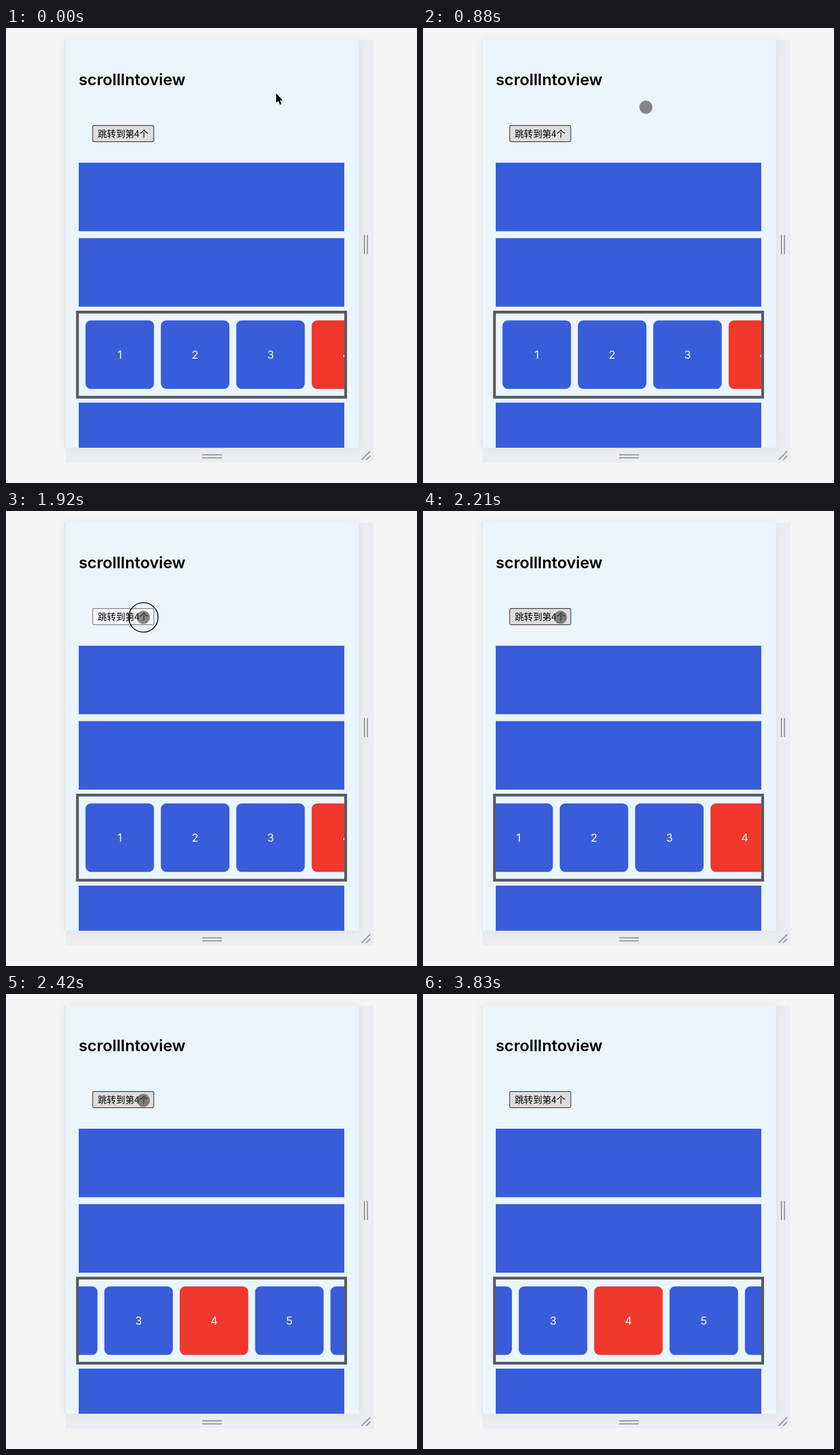
Animation, 712 px wide and 787 px high, one loop 3930 ms. Source, as an HTML page:

```html
<!DOCTYPE html>
<html lang="zh">
<head>
<meta charset="utf-8">
<title>scrollIntoview</title>
<style>
  html, body { margin: 0; width: 100%; height: 100%; overflow: hidden; background: #f5f5f5; }
  svg { display: block; width: 712px; height: 787px; }
  .page { fill: #eaf5fc; filter: drop-shadow(0 0 8px rgba(0, 0, 0, .06)); }
  .strip { fill: #ecedf1; }
  .grip { stroke: #929497; stroke-width: 2; fill: none; }
  .bar, .tile { fill: #395cdb; }
  .tile.goal { fill: #f0382d; }
  .num { font: 400 19px Inter, sans-serif; fill: #fff; text-anchor: middle; }
  h1, .title { font: 600 27.5px Inter, sans-serif; }
  .label { font: 400 15.83px "Noto Sans CJK SC", "Noto Sans CJK", sans-serif; }
</style>
</head>
<body>
<svg viewBox="0 0 712 787">
  <defs>
    <clipPath id="view"><rect x="126" y="494" width="460" height="142"/></clipPath>
  </defs>
  <rect class="strip" x="103" y="20" width="534" height="731.5"/>
  <rect class="page" x="102" y="20" width="509.5" height="706"/>
  <path d="M102.3 20V726" stroke="#cdd5da" stroke-width=".8"/>
  <path class="grip" d="M621 358V391M626.2 358V391M340 738.3H374M340 743.4H374M616 747L631 732M624 747L631 740"/>

  <text class="title" x="126" y="99">scrollIntoview</text>
  <rect id="button" x="150.2" y="168.6" width="105.8" height="28" rx="2.8" stroke-width="1.2"/>
  <text class="label" x="159" y="188.6">跳转到第4个</text>

  <rect class="bar" x="126" y="233" width="460" height="118.5"/>
  <rect class="bar" x="126" y="363.5" width="460" height="118.5"/>
  <rect class="bar" x="126" y="648" width="460" height="78"/>
  <rect x="123.8" y="491.4" width="464.6" height="147.2" fill="#eaf5fe" stroke="#595a60" stroke-width="4.8"/>
  <g clip-path="url(#view)"><g id="row"></g></g>

  <circle id="ring" cx="238" cy="184" r="25.5" fill="none" stroke="#0b0b0b" stroke-width="1.6"/>
  <circle id="dot" r="11.5" fill="#3c3c3c" fill-opacity=".6" stroke="#fff" stroke-opacity=".3"/>
  <path id="arrow" d="M0 0V16.5L3.7 13.2L6.5 19.8L9.2 18.7L6.4 12.2H11.4Z" stroke="#fff" stroke-width="1.4" paint-order="stroke"/>
</svg>
<script>
  const LOOP = 3930;
  const TILE = 118.7, PITCH = 130.6, FIRST = 137.7;
  const PRESS = 1750, RELEASE = 2100;
  const SCROLL = { start: 2128, time: 325, by: 233 };

  // Pointer path: time, x, y
  const PATH = [
    [0, 468, 113], [580, 468, 113], [700, 445, 120], [880, 386.5, 137],
    [1080, 315, 160], [1300, 260, 177], [1580, 238, 184], [2940, 238, 184],
    [3050, 262, 179], [3140, 305, 169], [3250, 382.5, 153.5], [3330, 452, 149],
    [3670, 452, 149], [3710, 500, 115], [3750, 575, 60], [3790, 661, 2], [3830, 700, -30]
  ];

  const $ = id => document.getElementById(id);
  const button = $('button'), row = $('row'), ring = $('ring'), dot = $('dot'), arrow = $('arrow');

  function add(tag, attrs, text = '') {
    const el = document.createElementNS('http://www.w3.org/2000/svg', tag);
    for (const key in attrs) el.setAttribute(key, attrs[key]);
    el.textContent = text;
    row.append(el);
  }

  for (let n = 1; n <= 6; n++) {
    const x = FIRST + (n - 1) * PITCH;
    add('rect', { class: n === 4 ? 'tile goal' : 'tile', x, y: 505.8, width: TILE, height: 118.4, rx: 9.5 });
    add('text', { class: 'num', x: x + TILE / 2, y: 572 }, n);
  }

  // cubic-bezier(.42, 0, .58, 1)
  function easeInOut(p) {
    if (p <= 0) return 0;
    if (p >= 1) return 1;
    let lo = 0, hi = 1, s = .5;
    for (let i = 0; i < 24; i++) {
      s = (lo + hi) / 2;
      const x = 1.26 * s * (1 - s) ** 2 + 1.74 * s * s * (1 - s) + s ** 3;
      if (x < p) lo = s; else hi = s;
    }
    return s * s * (3 - 2 * s);
  }

  function pointerAt(t) {
    let i = 1;
    while (i < PATH.length - 1 && PATH[i][0] <= t) i++;
    const [t0, x0, y0] = PATH[i - 1], [t1, x1, y1] = PATH[i];
    const p = Math.min(1, (t - t0) / (t1 - t0));
    return [x0 + (x1 - x0) * p, y0 + (y1 - y0) * p];
  }

  const show = (el, on) => el.setAttribute('visibility', on ? 'visible' : 'hidden');

  function draw(t) {
    const [x, y] = pointerAt(t);
    const inside = t >= 40 && x < 611 && y > 20;
    const gone = t >= 3830;
    const pressed = t >= PRESS && t < RELEASE;

    for (const el of [dot, arrow]) el.setAttribute('transform', `translate(${x} ${y})`);
    show(dot, inside && !gone);
    show(arrow, !inside && !gone);
    show(ring, pressed);
    button.setAttribute('fill', pressed ? '#f4f5f7' : '#dfdddd');
    button.setAttribute('stroke', pressed ? '#77797b' : '#343434');

    const shift = SCROLL.by * easeInOut((t - SCROLL.start) / SCROLL.time);
    row.setAttribute('transform', `translate(${-shift} 0)`);
  }

  const begin = performance.now();
  function tick() {
    draw((performance.now() - begin) % LOOP);
    requestAnimationFrame(tick);
  }
  tick();
</script>
</body>
</html>
```
